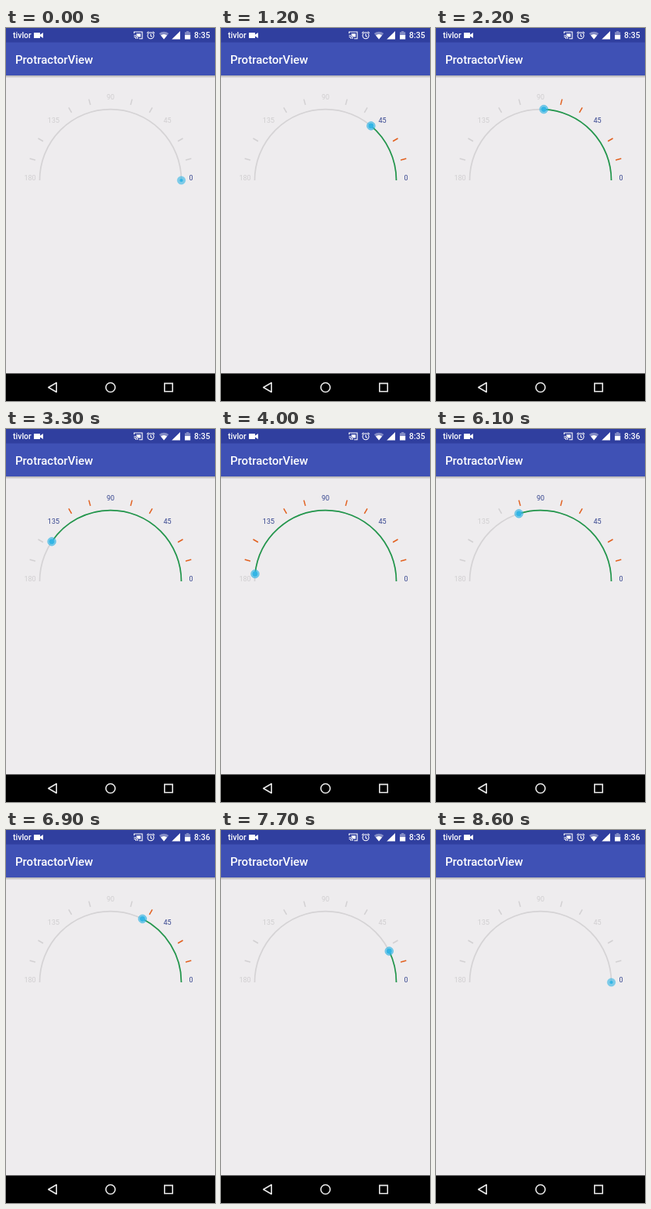
These frames come from a looping animation (270 px wide and 480 px high, 8700 ms). An HTML page:

```html
<!DOCTYPE html>
<html lang="en">
<head>
<meta charset="utf-8">
<title>ProtractorView</title>
<style>
  html, body { margin: 0; width: 100%; height: 100%; overflow: hidden; background: #eeecee; }
  svg { display: block; width: 100vw; height: 100vh; }
  text { font-family: Roboto, "Noto Sans", sans-serif; }
  .bar { font-weight: 500; fill: #fff; }
  #scale line { stroke: #d2d0d2; stroke-width: 1.5; }
  #scale text { fill: #d0ced0; font-size: 9px; text-anchor: middle; }
  #scale line.on { stroke: #e2601f; }
  #scale text.on { fill: #35458f; }
  .arc { fill: none; stroke-width: 1.7; }
</style>
</head>
<body>
<svg viewBox="0 0 270 480">
  <defs>
    <linearGradient id="shade" x2="0" y2="1">
      <stop stop-color="#000" stop-opacity=".3"/>
      <stop offset="1" stop-color="#000" stop-opacity="0"/>
    </linearGradient>
  </defs>
  <rect width="270" height="480" fill="#eeecee"/>
  <rect y="60.5" width="270" height="4" fill="url(#shade)"/>
  <rect width="270" height="61" fill="#3f51b5"/>
  <rect width="270" height="18.5" fill="#303f9f"/>
  <text class="bar" x="12" y="46" font-size="15">ProtractorView</text>

  <!-- status bar -->
  <g class="bar" font-size="10.5">
    <text x="9" y="13.3">tivlor</text>
    <text id="clock" x="243" y="13.3"></text>
    <path d="M36 6h8v2.4l4-2.4v7l-4-2.4v2.4h-8z"/>
    <g fill="none" stroke="#fff" stroke-width="1.1">
      <path d="M165.5 7V5h10.5v8.8h-4M165.3 9.2a4.8 4.8 0 0 1 4.8 4.8M165.3 11.3a2.7 2.7 0 0 1 2.7 2.7"/>
      <circle cx="187" cy="9.8" r="4"/>
      <path d="M187 7.3v2.8l1.8 1.1M182 6.6l2.4-2M192 6.6l-2.4-2"/>
    </g>
    <path d="M168.5 7.2h5.4v4.4h-3.3a5 5 0 0 0-2.1-2.4z"/>
    <path d="M197.8 7a10 10 0 0 1 12.4 0L204 14.5z" opacity=".4"/>
    <path d="M200 9.5a6.5 6.5 0 0 1 8 0l-4 5z"/>
    <path d="M225 4v10.5h-10.8z"/>
    <path d="M231 5.2h2V4h3.2v1.2h2V10H231z" opacity=".4"/>
    <path d="M231 9h7.2v5.5H231z"/>
  </g>

  <path class="arc" stroke="#d5d3d5" d="M226.5 196a91.5 91.5 0 0 0-183 0"/>
  <path class="arc" id="sweep" stroke="#22974c" pathLength="180" d="M226.5 196a91.5 91.5 0 0 0-183 0"/>
  <g id="scale"></g>
  <g id="thumb" fill="#33b5e5">
    <circle id="halo" r="5.3" fill-opacity=".6" stroke="#33b5e5"/>
    <circle id="dot"/>
  </g>

  <!-- navigation bar -->
  <rect y="444.5" width="270" height="36"/>
  <g fill="none" stroke="#e8e8e8" stroke-width="1.6">
    <path d="M54.8 462.5l10.4-6v12z" stroke-linejoin="round"/>
    <circle cx="135" cy="462.5" r="6"/>
    <path d="M204.8 457.4h10.4v10.4h-10.4z"/>
  </g>
</svg>
<script>
const LOOP = 8700, STEP = 100, CX = 135, CY = 196, R = 91.5;
const $ = id => document.getElementById(id);

// drag path: [time in ms, angle in degrees]
const drag = [[0, 0], [1200, 50], [2700, 106], [3300, 146], [3600, 162], [4200, 180], [4800, 180],
  [5100, 174], [5700, 136], [6100, 107.8], [6600, 80], [7500, 29.5], [7700, 26], [8400, 0], [LOOP, 0]];

function polar(deg, r) {
  const a = deg * Math.PI / 180;
  return [CX + r * Math.cos(a), CY - r * Math.sin(a)];
}

function add(tag, attrs) {
  const el = document.createElementNS("http://www.w3.org/2000/svg", tag);
  for (const k in attrs) el.setAttribute(k, attrs[k]);
  return $("scale").appendChild(el);
}

const marks = [];
for (let deg = 0; deg <= 180; deg += 15) {
  let el;
  if (deg % 45) {
    const [x1, y1] = polar(deg, 100.5), [x2, y2] = polar(deg, 108);
    el = add("line", { x1, y1, x2, y2 });
  } else {
    const [x, y] = polar(deg, 104);
    el = add("text", { x, y });
    el.textContent = deg;
  }
  marks.push({ deg, el });
}

function angleAt(t) {
  const i = drag.findIndex(p => p[0] > t);
  const [t0, a0] = drag[i - 1], [t1, a1] = drag[i];
  return a0 + (a1 - a0) * (t - t0) / (t1 - t0);
}

function draw(now) {
  const t = Math.floor(now % LOOP / STEP) * STEP;
  const angle = angleAt(t), pressed = t >= 100 && t < 8600;
  for (const { deg, el } of marks) el.classList.toggle("on", deg <= angle);
  $("sweep").setAttribute("stroke-dasharray", angle + " 400");
  $("thumb").setAttribute("transform", `translate(${polar(angle, R)})`);
  $("halo").setAttribute("stroke-opacity", pressed ? .6 : .2);
  $("dot").setAttribute("r", pressed ? 3.4 : 2.1);
  $("clock").textContent = t < 4600 ? "8:35" : "8:36";
}

const start = performance.now();
function tick() {
  draw(performance.now() - start);
  requestAnimationFrame(tick);
}
tick();
</script>
</body>
</html>
```
